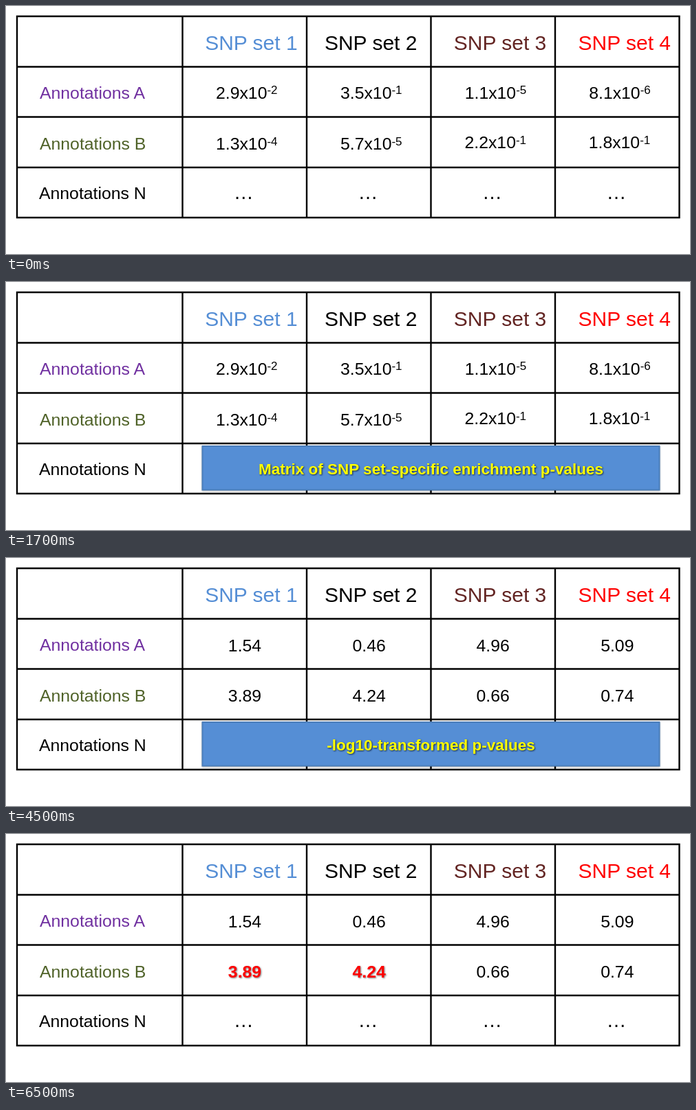
Recreate the animation shown at these times as an HTML page. Size 994 by 361 pixels, loop 8 s.

```html
<!DOCTYPE html>
<html lang="en">
<head>
<meta charset="utf-8">
<title>SNP set enrichment</title>
<style>
  html, body { margin: 0; width: 100%; height: 100%; overflow: hidden; background: #fff; }
  svg { display: block; width: 100%; height: 100%; }
  text { font-family: "Liberation Sans", Arial, sans-serif; font-size: 24.8px; white-space: pre; }
  .mid { text-anchor: middle; }
  .head { font-size: 30px; }
  .dots { font-size: 29px; }
  .sup { font-size: 17px; }
  .hot { font-weight: bold; fill: #f00; filter: drop-shadow(1.3px 1.3px 0.8px rgba(0, 0, 0, .5)); }
  .caption { font-size: 22.5px; font-weight: bold; fill: #ff0; filter: drop-shadow(1.4px 1.4px 0.8px rgba(0, 0, 0, .7)); }
  .panel { fill: #558ed5; stroke: #4a7ebb; stroke-width: 2; filter: drop-shadow(0 1px 1px rgba(0, 0, 0, .3)); }
</style>
</head>
<body>
<svg id="stage" viewBox="0 0 994 361"></svg>
<script>
const NS = "http://www.w3.org/2000/svg";
const LOOP = 8000;
const stage = document.getElementById("stage");

function add(parent, tag, attrs, content) {
  const el = document.createElementNS(NS, tag);
  for (const key in attrs) el.setAttribute(key, attrs[key]);
  if (content) el.textContent = content;
  return parent.appendChild(el);
}
const group = () => add(stage, "g", {});
const label = (parent, x, y, content, cls = "mid", fill = "#000") =>
  add(parent, "text", { x, y, class: cls, fill }, content);

function power(parent, x, y, base, exponent) {
  const el = label(parent, x, y, base + "x10");
  add(el, "tspan", { class: "sup", dy: -6.5 }, exponent);
}

// Table grid and fixed headings
const grid = group();
add(grid, "path", {
  d: "M16 15H978.5V308H16Z" +
     [256.5, 437, 617.5, 798].map(x => `M${x} 15V308`).join("") +
     [88.5, 161.5, 235].map(y => `M16 ${y}H978.5`).join(""),
  fill: "none", stroke: "#000", "stroke-width": 2.4
});
["#558ed5", "#000", "#632523", "#f00"].forEach((color, i) =>
  label(grid, [356.4, 530.2, 718, 898.8][i], 64, `SNP set ${i + 1}`, "mid head", color));
label(grid, 49, 134.5, "Annotations A", "", "#7030a0");
label(grid, 49, 209, "Annotations B", "", "#4f6228");
label(grid, 48, 281, "Annotations N", "");

const dots = group();
[345.3, 526, 706.5, 887].forEach(x => label(dots, x, 281, "…", "mid dots"));

// p-values
const raw = group();
power(raw, 349.8, 134.5, "2.9", "-2");
power(raw, 530.8, 134.5, "3.5", "-1");
power(raw, 711.5, 134.5, "1.1", "-5");
power(raw, 892, 134.5, "8.1", "-6");
power(raw, 349.8, 209, "1.3", "-4");
power(raw, 530.8, 209, "5.7", "-5");
power(raw, 711.3, 207, "2.2", "-1");
power(raw, 891.5, 207, "1.8", "-1");

// Transformed values
const cols = [347, 527.7, 707.7, 888.3];
const logs = group();
["1.54", "0.46", "4.96", "5.09"].forEach((v, i) => label(logs, cols[i], 136, v));
const rowB = ["3.89", "4.24", "0.66", "0.74"].map((v, i) => label(logs, cols[i], 209, v));

const banner = group();
add(banner, "rect", { class: "panel", x: 285.5, y: 239, width: 664, height: 63.5 });
const caption = label(banner, 617.5, 280, "", "mid caption", "#ff0");

const show = (el, on) => el.setAttribute("display", on ? "inline" : "none");

function draw(t) {
  const first = t >= 500 && t < 2500;
  const second = t >= 4500 && t < 6500;
  show(raw, t < 2500);
  show(logs, t >= 2500);
  show(dots, !first && !second);
  show(banner, first || second);
  caption.textContent = first ? "Matrix of SNP set-specific enrichment p-values"
                              : "-log10-transformed p-values";
  rowB.slice(0, 2).forEach(el => el.setAttribute("class", t >= 6500 ? "mid hot" : "mid"));
}

const start = performance.now();
function tick() {
  draw((performance.now() - start) % LOOP);
  requestAnimationFrame(tick);
}
draw(0);
requestAnimationFrame(tick);
</script>
</body>
</html>
```
